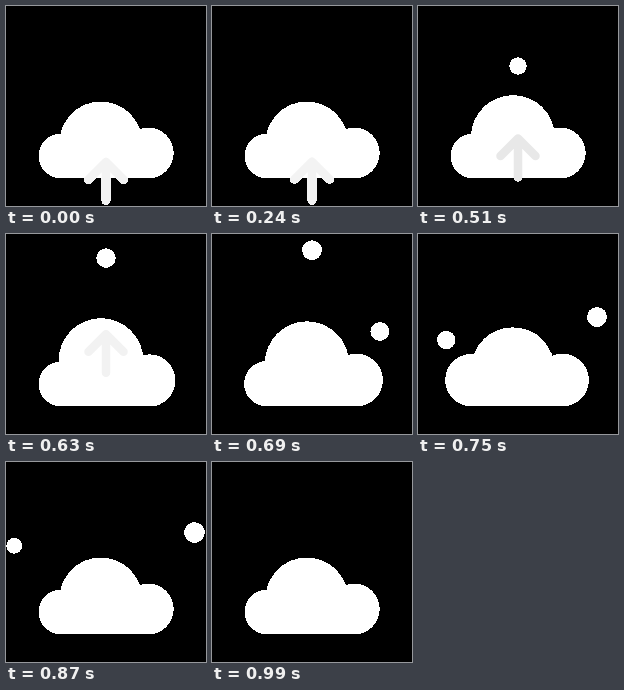
Recreate the animation shown at these times as an HTML page with a canvas. Size 200 px wide and 200 px high, loop 1800 ms.

```html
<!DOCTYPE html>
<html>
<head>
<meta charset="utf-8">
<style>
html, body { margin: 0; width: 100%; height: 100%; overflow: hidden; background: #000; }
canvas { display: block; width: 100vw; height: 100vh; }
</style>
</head>
<body>
<canvas id="stage" width="200" height="200"></canvas>
<script>
const ctx = document.getElementById('stage').getContext('2d', { willReadFrequently: true });
const LOOP = 1800, STEP = 30;

const clamp = v => Math.min(1, Math.max(0, v));
const progress = (t, start, end) => clamp((t - start) / (end - start));
const mix = (a, b, k) => a + (b - a) * k;
const bump = (t, start, end) => Math.sin(Math.PI * progress(t, start, end));
const easeOut = u => 1 - (1 - u) ** 2;

function disc(x, y, r) {
  ctx.beginPath();
  ctx.arc(x, y, r, 0, 2 * Math.PI);
  ctx.fill();
}

// A droplet shot out of the cloud, slowing down on its way
function droplet(t, start, end, from, to) {
  if (t < start || t > end) return;
  const e = easeOut(progress(t, start, end));
  disc(...from.map((v, i) => mix(v, to[i], e)));
}

function cloud(t) {
  const top = bump(t, 450, 770);
  const right = bump(t, 580, 860);
  const left = bump(t, 685, 860);
  ctx.save();
  ctx.beginPath();
  ctx.rect(0, 0, 200, 172);
  ctx.clip();
  disc(94.8 + 0.2 * top, 137 - 10.5 * top, 41.1 + top);
  disc(142.2 + 2.4 * right, 147 - right, 25.1 + right);
  disc(55 - 1.7 * left, 150 - 4.2 * left, 22 + 4.2 * left);
  ctx.fillRect(55, 135, 87, 37);
  ctx.restore();
}

function arrow(t) {
  if (t >= 690) return;
  const y = 156 - 75 * progress(t, 150, 680) ** 3;
  const dark = mix(243, 232, progress(t, 390, 510));
  const shade = Math.round(mix(dark, 250, progress(t, 560, 690)));
  ctx.strokeStyle = `rgb(${shade},${shade},${shade})`;
  ctx.lineWidth = 8.5;
  ctx.lineCap = ctx.lineJoin = 'round';
  ctx.beginPath();
  ctx.moveTo(82.5, y + 17.5);
  ctx.lineTo(100, y);
  ctx.lineTo(117.5, y + 17.5);
  ctx.moveTo(100, y);
  ctx.lineTo(100, y + 38.5);
  ctx.stroke();
}

// Outer edges are hard, without smoothing
function harden() {
  const image = ctx.getImageData(0, 0, 200, 200);
  const d = image.data;
  for (let i = 3; i < d.length; i += 4) d[i] = d[i] > 25 ? 255 : 0;
  ctx.putImageData(image, 0, 0);
}

function draw(t) {
  ctx.clearRect(0, 0, 200, 200);
  ctx.fillStyle = '#fff';
  droplet(t, 447, 727, [100, 90, 7.5], [100, 15, 9.5]);
  droplet(t, 642, 878, [156, 113, 8.5], [188.5, 70.5, 10]);
  droplet(t, 695, 885, [48, 128, 10], [8, 83.5, 7.5]);
  if (t > 885 && t < 990) disc(8, 83.5, 7.5 * (1 - progress(t, 870, 990)));
  cloud(t);
  arrow(t);
  harden();
}

const begin = performance.now();
function tick() {
  const t = (performance.now() - begin) % LOOP;
  draw(Math.floor(t / STEP) * STEP);
  requestAnimationFrame(tick);
}
tick();
</script>
</body>
</html>
```
